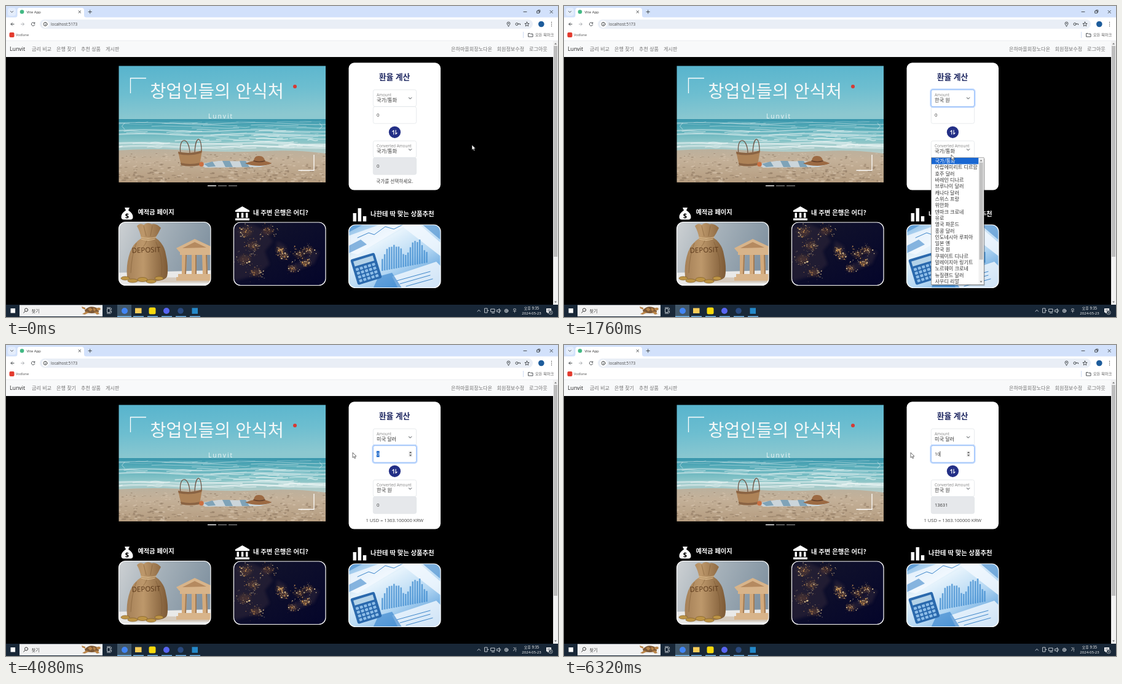
Animation of 898 by 506 pixels, one loop 6.4 s. Source, as an HTML page:

```html
<!DOCTYPE html>
<html lang="ko">
<head>
<meta charset="utf-8">
<title>Vite App</title>
<style>
html, body { margin: 0; width: 100%; height: 100%; overflow: hidden; background: #000; }
svg { display: block; width: 100vw; height: 100vh; }
text { font-family: "Open Sans", "Noto Sans CJK KR", "Noto Sans CJK", sans-serif; white-space: pre; }
.ko { font-family: "Noto Sans CJK KR", "Noto Sans CJK", sans-serif; }
.line { fill: none; stroke-linecap: round; stroke-linejoin: round; }
</style>
</head>
<body>
<svg id="stage" viewBox="0 0 898 506" preserveAspectRatio="none">
<defs>
  <linearGradient id="sky" x2=".15" y2="1"><stop stop-color="#56b3cd"/><stop offset=".55" stop-color="#6dbed0"/><stop offset="1" stop-color="#8cc8d0"/></linearGradient>
  <linearGradient id="sea" x2="0" y2="1"><stop stop-color="#3795ab"/><stop offset=".25" stop-color="#55abb8"/><stop offset=".6" stop-color="#84c3c7"/><stop offset="1" stop-color="#b9cdc8"/></linearGradient>
  <linearGradient id="sand" x2="0" y2="1"><stop stop-color="#bbb09d"/><stop offset=".3" stop-color="#c4b199"/><stop offset="1" stop-color="#b39a7d"/></linearGradient>
  <linearGradient id="wall" x2="1" y2=".3"><stop stop-color="#d0d3d5"/><stop offset=".5" stop-color="#a3afb8"/><stop offset="1" stop-color="#8293a1"/></linearGradient>
  <linearGradient id="bag" x2="1"><stop stop-color="#a58057"/><stop offset=".4" stop-color="#bd986b"/><stop offset="1" stop-color="#7d5a36"/></linearGradient>
  <linearGradient id="paper" x2=".8" y2="1"><stop stop-color="#7db5e4"/><stop offset=".35" stop-color="#e6f3fc"/><stop offset=".65" stop-color="#b4d7f3"/><stop offset="1" stop-color="#4a94d6"/></linearGradient>
  <linearGradient id="night" x2="1" y2="1"><stop stop-color="#14152c"/><stop offset="1" stop-color="#04052a"/></linearGradient>
  <filter id="soft" x="-20%" y="-20%" width="140%" height="140%"><feGaussianBlur stdDeviation="2"/></filter>
  <filter id="blur"><feGaussianBlur stdDeviation=".55"/></filter>
  <clipPath id="c0"><rect x="183.5" y="97.5" width="336.5" height="189.5"/></clipPath>
  <clipPath id="c1"><rect x="183.5" y="351.5" width="149.5" height="103" rx="11"/></clipPath>
  <clipPath id="c2"><rect x="370.5" y="352" width="149.5" height="102.5" rx="11"/></clipPath>
  <clipPath id="c3"><rect x="557.5" y="356" width="149.5" height="102.5" rx="11"/></clipPath>
</defs>
<rect width="898" height="506"/>

<!-- browser frame -->
<path fill="#d2e1fb" d="M0 0H898V22H0z"/>
<path fill="#fff" d="M0 18.500H15Q18.500 18.500 18.500 15V7Q18.500 3 22.500 3H123Q127 3 127 7V15Q127 18.500 130.500 18.500H898V57H0z"/>
<rect x="3" y="3" width="13" height="13" rx="4" fill="#e4edfc"/>
<circle cx="26" cy="9.500" r="3.300" fill="#41b883"/>
<rect x="55" y="22" width="802" height="15" rx="7.500" fill="#e9eef6"/>
<circle cx="64" cy="29.500" r="5.500" fill="#fff"/>
<g class="line" stroke="#3c4043" stroke-width=".9">
  <path d="M7.500 8.500l2 2 2-2M118 7.700l3.600 3.600m0-3.600l-3.600 3.600M134 9.500h5.400m-2.700-2.700v5.400M842 9.500h5M864 8h3.500v3.500H864zM865.500 8V6.700h3.300v3.300h-1.300M885 7.300l4.400 4.400m0-4.400l-4.400 4.400"/>
  <path d="M13 29.500H8m2.400-2.400L8 29.500l2.400 2.400M46.500 28a2.800 2.800 0 1 0 .3 2.400m0-3.600v1.500h-1.600M64 29.300v2M64 27.500v.1"/>
  <path d="M24.500 29.500h5m-2.400-2.400l2.400 2.400-2.400 2.400" stroke="#a9acb0"/>
  <circle cx="64" cy="29.500" r="3"/>
  <path d="M817.500 33q-2.500-3-2.500-4.500a2.500 2.500 0 0 1 5 0q0 1.500-2.500 4.500zM833 29h3.500v1.500M847.500 26l1 2.400 2.600.2-2 1.700.6 2.500-2.200-1.400-2.200 1.400.6-2.500-2-1.700 2.600-.2z"/>
  <circle cx="831" cy="29.500" r="2"/>
  <path d="M850 44.500h2.500l1 1h3.500v4.500h-7z"/>
</g>
<circle cx="817.500" cy="28.500" r=".9" fill="#3c4043"/>
<circle cx="870.800" cy="29.500" r="4.800" fill="#1d5c9b"/>
<path d="M887.500 26.500v.1m0 2.900v.1m0 2.900v.1" class="line" stroke="#333" stroke-width="1.300"/>
<rect x="5.500" y="43" width="8" height="8" rx="2" fill="#e33b2e"/>
<path d="M841.500 42v10" stroke="#cfdcf3"/>
<path d="M0 56.500h898" stroke="#eceef1"/>

<!-- page -->
<path fill="#f8f9fa" d="M0 57H890V83H0z"/>
<path fill="#f1f1f1" d="M890 57h8v429h-8z"/>
<path fill="#bdbdbd" d="M891 65h6v343h-6z"/>
<path fill="#777" d="M892 62.500l2-2.500 2 2.500zM892 480.500l2 2.500 2-2.500z"/>

<g clip-path="url(#c0)">
  <g filter="url(#blur)">
    <path fill="url(#sky)" d="M180 94H524V185H180z"/>
    <path fill="url(#sea)" d="M180 184H524V240H180z"/>
    <g id="waves" class="line" stroke="#edf6f5"></g>
    <path fill="url(#sand)" d="M180 235Q240 231 300 235T420 236 524 241V291H180z"/>
    <g id="grit"></g>
    <path fill="#cbd5da" d="M314 257l32-5 58 1 30 3-20 6-90 1z"/>
    <path fill="#7fa3b8" d="M322 257l14-4 5 8-12 1zM352 252h12l5 10h-12zM380 252h10l6 10h-12z"/>
    <path d="M284 240C280 212 298 212 299 239M307 240C308 210 318 210 318 236" class="line" stroke="#70584a" stroke-width="1.300"/>
    <path fill="#ad8257" d="M280 237q19 5 39-2l-4 24q-16 3-30 0z"/>
    <path fill="#8a6343" d="M280 237q19 5 39-2l-1 4q-18 6-37 2zM284 255q15 4 32 0l-1 4q-16 3-30 0z"/>
    <circle cx="318" cy="257.500" r="3.800" fill="#cb6f41"/>
    <path fill="#9c6a43" d="M389 256q7-3 14-4 1-9 9-8 8 0 9 8 7 2 12 4-10 4-21 4-14 0-23-4z"/>
    <path d="M403 252q9 3 18 0" class="line" stroke="#65412a" stroke-width="1.600"/>
  </g>
  <path fill="none" stroke="#fff" stroke-width="1.300" d="M202.500 142V117.500H228M475.500 267.500H501V242"/>
  <circle cx="470" cy="131" r="3" fill="#d63a35"/>
  <path d="M193 190.500l-4.500 5 4.500 5M510 190.500l4.500 5-4.500 5" class="line" stroke="#fff" stroke-opacity=".5"/>
</g>
<path fill="#fff" d="M328 291.800h14v1.400h-14z"/>
<path fill="#777" d="M345 291.800h14v1.400h-14zM362 291.800h14v1.400h-14z"/>

<!-- heading icons -->
<path fill="#fff" d="M193 328h8l-2 4.500q8 5 7.500 11.500-.5 3.500-4 3.500h-11q-3.500 0-4-3.500-.5-6.500 7.500-11.500z"/>
<path fill="#fff" d="M373 335v-2.500l11.500-6.500 11.500 6.500v2.500zM375.500 336.500h3.500v8h-3.500zM382.800 336.500h3.500v8h-3.500zM390 336.500h3.500v8h-3.500zM373 345.500h23v3.200h-23z"/>
<path fill="#fff" d="M564.500 337h5.500v13.500h-5.500zM572.500 329h5.500v21.500h-5.500zM580.700 342h5.500v8.500h-5.500z"/>

<g clip-path="url(#c1)"><g filter="url(#blur)">
  <path fill="url(#wall)" d="M180 348h156v110H180z"/>
  <path fill="#e9e9e8" d="M180 434l156-4v28H180z"/>
  <path fill="#a7805a" opacity=".3" d="M200 445q55-7 135 0v5H210z"/>
  <path fill="url(#bag)" d="M213 358Q218 352 224 356Q230 351 237 355Q244 353 252 361Q248 370 243 377Q257 386 260 404Q265 426 262 440Q258 449 228 448Q201 449 197 440Q195 420 202 400Q207 386 220 378Q218 367 213 358z"/>
  <path d="M219 376q12 4 25 0M220 379q11 4 22 0" class="line" stroke="#dcbd90" stroke-width="1.300"/>
  <path d="M212 386q-8 20-9 48M244 384q12 24 9 54M229 382q-2 6-6 10M224 358l4 16M238 358l-3 16" class="line" stroke="#76542f" opacity=".5"/>
  <g fill="#bd9445" stroke="#785620" stroke-width=".6">
    <ellipse cx="194" cy="443" rx="7" ry="3"/><ellipse cx="206" cy="447" rx="8" ry="3"/><ellipse cx="222" cy="445" rx="8" ry="3.500"/><ellipse cx="236" cy="448" rx="8" ry="3"/><ellipse cx="249" cy="443" rx="7" ry="3"/>
  </g>
  <path fill="#d8b48a" d="M277 394l30-15 28 13v8h-53zM283 400h50v5h-50zM280 436h54v5h-54zM277 441h57v6h-57z"/>
  <path fill="#b58a60" d="M287 394l20-10 19 9z"/>
  <path fill="#d3aa7c" d="M286 405h8l-1 31h-7zM302 405h8v31h-8zM319 405h8l1 31h-8z"/>
  <path fill="#a17a54" d="M292 405h2l-1 31h-2zM308 405h2v31h-2zM325 405h2l1 31h-2z"/>
</g></g>
<g clip-path="url(#c2)">
  <path fill="url(#night)" d="M370 352h150v103H370z"/>
  <path fill="#35293a" opacity=".5" filter="url(#soft)" d="M370 360l30-5 24 12 10 16-13 16 8 21-20 18-40 10zM441 382l14 8 5 19-13 5-8-18zM460 424l22-10 16-18 12 4-9 20-38 14z"/>
  <g id="glows" fill="#a8672c" filter="url(#soft)"></g>
  <g id="lights"></g>
</g>
<g clip-path="url(#c3)"><g filter="url(#blur)">
  <path fill="url(#paper)" d="M554 352h157v110H554z"/>
  <path fill="#f5fbff" opacity=".8" d="M557 374l50-18h45l-80 48-15-3zM640 355h32l35 30v22zM628 440l72-24 8 8v36h-70z"/>
  <path fill="#4189cb" opacity=".6" d="M554 352h34l-34 18zM673 352h38v32zM554 392l23-12 10 8-33 16z"/>
  <path fill="#2f7fcb" opacity=".6" d="M606 440l22-6 18 28h-50z"/>
  <g id="bars" fill="#3d8bd0" opacity=".75"></g>
  <path class="line" stroke="#3c85ca" d="M572 377l18-8 9 3 18-13 14 4 22-11M636 447l54-15M641 452l49-14M651 456l43-12"/>
  <g transform="translate(560 413) rotate(-17)">
    <rect width="41" height="43" rx="3" fill="#2a69ad"/>
    <rect x="4" y="4" width="33" height="8.500" fill="#b3d2e8"/>
    <g id="keys" fill="#8dbde8"></g>
  </g>
</g></g>
<g fill="none" stroke="#fff" stroke-width="1.200">
  <rect x="183.500" y="351.500" width="149.500" height="103" rx="11"/>
  <rect x="370.500" y="352" width="149.500" height="102.500" rx="11"/>
  <rect x="557.500" y="356" width="149.500" height="102.500" rx="11"/>
</g>

<!-- exchange card -->
<rect x="557.500" y="92.300" width="149.500" height="207.300" rx="9" fill="#fff"/>
<g fill="#fff" stroke="#dee2e6" stroke-width=".7">
  <rect x="597.300" y="136.300" width="70.200" height="27.200" rx="2.800"/>
  <rect x="597.300" y="163.700" width="70.200" height="27.500" rx="2.800"/>
  <rect x="597.300" y="219.500" width="70.200" height="27.200" rx="2.800"/>
  <rect x="597.300" y="246.800" width="70.200" height="27.500" rx="2.800" fill="#e6e8eb"/>
</g>
<rect id="glow" x="596.200" width="72.400" height="29.600" rx="3.800" fill="none" stroke="#0d6efd" stroke-opacity=".25" stroke-width="1.900"/>
<rect id="ring" x="597.300" width="70.200" height="27.400" rx="2.800" fill="none" stroke="#86b7fe" stroke-width=".8"/>
<path d="M655.300 149l2.200 2.200 2.200-2.200M655.300 232.700l2.200 2.200 2.200-2.200" class="line" stroke="#343a40"/>
<circle cx="632.400" cy="205.300" r="9.600" fill="#232f86"/>
<path d="M630.700 208.800v-6.500l-2 2M634 202v6.500l2-2" class="line" stroke="#fff" stroke-width="1.100"/>
<g id="spin"><rect x="655" y="172.500" width="6" height="9.500" fill="#ececec"/><path fill="#555" d="M656 176l2-2.500 2 2.500zM656 178.500l2 2.500 2-2.500z"/></g>
<rect id="pick" x="602.800" y="172.500" width="4.700" height="9.800" fill="#1a66c9"/>
<path id="caret" d="M611.800 172.800v9" stroke="#111" stroke-width=".7"/>

<!-- taskbar -->
<path fill="#182737" d="M0 486h898v20H0z"/>
<path fill="#f1f1f1" d="M22 486.500h135V505H22z"/>
<path fill="#41576a" d="M181 486h23v20h-23z"/>
<path fill="#76b9ed" d="M181 504.600h23v1.400h-23zM207 504.600h17v1.400h-17zM230 504.600h17v1.400h-17zM253 504.600h17v1.400h-17zM276 504.600h17v1.400h-17zM299 504.600h17v1.400h-17z"/>
<rect x="7.500" y="492" width="7.500" height="7.500" fill="#fff"/>
<circle cx="33" cy="494.500" r="2.600" class="line" stroke="#333"/>
<path d="M31 496.500l-2.500 3" stroke="#333"/>
<g fill="#b98448"><path d="M128 495q8-9 19-4 4 3 4 7-12 4-22 0z" fill="#7d5835"/><path d="M147 492q6-3 7 1-1 3-6 2zM131 497l-7 4 4 1 7-3zM143 498l5 4 4-1-3-4zM129 491l-6-2 1 3 5 2z"/><path d="M133 493l4-2 4 3-4 3zM142 491l4 2-1 4-3-2z"/></g>
<g class="line" stroke="#e8edf1" stroke-width=".8">
  <path d="M165 492.500h4.500v6H165zM171.500 492v2m0 2v3M164.500 490.800h5.500M164.500 500.200h5.500"/>
  <path d="M767 497l2.300-2.500 2.300 2.500M779 492h4v7h-4zM783.500 495.500h1.500M789 493h6v4.500h-6zM790.500 499.500h4M799 494.500h1.500l2-2v7l-2-2H799zM804 494q1.500 1.700 0 3.500"/>
  <circle cx="814" cy="496" r="2.800"/><path d="M812.500 496h3M814 494.500v3"/>
</g>
<path fill="#fff" d="M879 492h8v6.500h-4l-2 2v-2h-2z"/>
<path d="M880.500 494h5m-5 2h5" stroke="#182737" stroke-width=".7"/>
<circle cx="886" cy="498.800" r="3.200" fill="#2c3a48" stroke="#fff" stroke-width=".5"/>
<circle cx="193" cy="496" r="5" fill="#4285f4"/>
<rect x="210" y="491.500" width="10.500" height="8.500" fill="#f7cc58"/>
<rect x="232.500" y="490.500" width="11" height="11" rx="2.500" fill="#f7d90c"/>
<circle cx="261" cy="496" r="5" fill="#5865f2"/>
<circle cx="284" cy="496" r="4.800" fill="#2a4a80"/>
<rect x="302.500" y="491.300" width="9.500" height="9.500" fill="#2489ca"/>

<g id="labels"></g>
<g id="menu">
  <rect x="598.500" y="1.500" width="86" height="207" fill="#000" opacity=".25"/>
  <rect x="597.500" y=".2" width="85.500" height="206.600" fill="#fff" stroke="#777" stroke-width=".7"/>
  <rect id="mark" x="598" width="76.500" height="10.310" fill="#1967d2"/>
  <g id="rows"></g>
  <path fill="#f1f1f1" d="M674.500.6h8.200v205.800h-8.200z"/>
  <path fill="#777" d="M676.500 6l2-2.500 2 2.500zM676.500 201l2 2.500 2-2.500z"/>
  <rect id="thumb" x="675.500" width="6.200" height="158" fill="#c1c1c1"/>
</g>
<path id="arrow" fill="#fff" stroke="#111" stroke-width=".6" d="M0 0v8.300l1.900-1.700 1.300 3 1.400-.6-1.300-2.900h2.600z"/>
<path id="hand" fill="#fff" stroke="#111" stroke-width=".6" d="M-1 -2.500q1-1 1.700 0v3.300l4 1q1 .4.900 1.700l-.8 4.800H.2L-3 4.200q.3-1.300 2 0z"/>
</svg>
<script>
const $ = id => document.getElementById(id);
const NS = "http://www.w3.org/2000/svg";
const add = (parent, tag, attrs) => {
  const el = document.createElementNS(NS, tag);
  for (const k in attrs) el.setAttribute(k, attrs[k]);
  return parent.appendChild(el);
};
const set = (id, attrs) => { for (const k in attrs) $(id).setAttribute(k, attrs[k]); };
const show = (id, on) => set(id, { visibility: on ? "visible" : "hidden" });

function label(x, y, size, str, fill = "#333", more = {}, parent = $("labels")) {
  const el = add(parent, "text", { x, y, "font-size": size, fill, ...more });
  if (/[가-힣]/.test(str)) el.setAttribute("class", "ko");
  el.textContent = str;
  return el;
}
function write(el, str) {
  if (el.textContent === str) return;
  el.textContent = str;
  el.setAttribute("class", /[가-힣]/.test(str) ? "ko" : "");
}

let seed = 7;
const rnd = () => (seed = seed * 16807 % 2147483647) / 2147483647;
const bell = () => rnd() + rnd() + rnd() - 1.5;

// photo textures
for (let i = 0; i < 70; i++) {
  const near = rnd(), x = 165 + rnd() * 340, y = 188 + near * 44, w = 14 + rnd() * 70;
  add($("waves"), "path", { d: `M${x} ${y}q${w / 4} ${-1 - near} ${w / 2} 0t${w / 2} ${bell()}`,
    "stroke-width": .5 + near * 1.6, opacity: .25 + rnd() * .45 });
}
for (const y of [191, 203, 209, 224, 229])
  add($("waves"), "path", { d: `M180 ${y}q45-3 90 0t90 0 90 0 90 1`, "stroke-width": 1 + (y - 188) / 16, opacity: .5 });
for (let i = 0; i < 420; i++) {
  const far = rnd();
  add($("grit"), "ellipse", { cx: 183 + rnd() * 337, cy: 240 + far * 47, rx: 1 + rnd() * (1.5 + far * 2.5), ry: .4 + rnd() * (.5 + far),
    fill: rnd() < .5 ? "#86705a" : "#dccab3", opacity: .5 });
}
const towns = [[390, 368, 16], [402, 390, 14], [388, 412, 16], [407, 434, 14], [426, 366, 15],
  [446, 397, 9], [453, 406, 9], [478, 404, 13], [492, 397, 12], [466, 427, 10], [488, 418, 9]];
for (const [x, y, r] of towns) {
  add($("glows"), "ellipse", { cx: x, cy: y, rx: r * .6, ry: r * .4, opacity: 4 / r });
  for (let i = 0; i < 48; i++)
    add($("lights"), "circle", { cx: x + bell() * r, cy: y + bell() * r * .8, r: .3 + rnd() * rnd() * 1.2,
      fill: rnd() < .35 ? "#ffe3a6" : "#c8914f", opacity: .35 + rnd() * .6 });
}
for (let i = 0; i < 20; i++) {
  const h = 10 + 26 * Math.abs(Math.sin(i * .33)) + rnd() * 10;
  add($("bars"), "rect", { x: 611 + i * 3.8, y: 431 - i * .7 - h, width: 2.5, height: h });
}
for (let i = 0; i < 20; i++)
  add($("keys"), "rect", { x: 4 + i % 5 * 6.9, y: 16 + (i / 5 | 0) * 6.4, width: 5, height: 4.4, rx: 1 });

// fixed text
const mid = { "text-anchor": "middle" }, bold = { "font-weight": 700 };
label(33.5, 12, 6, "Vite App");
label(73, 31.8, 6.4, "localhost:5173", "#444");
label(16, 48.8, 5.6, "Vodlane", "#555");
label(861, 49, 6.2, "모든 북마크", "#555");
label(6, 73, 8.8, "Lunvit", "#222", { "font-weight": 500 });
[[42, "금리 비교"], [82, "은행 찾기"], [122, "추천 상품"], [162, "게시판"],
 [724, "은하마을회장노다온"], [798.5, "회원정보수정"], [851, "로그아웃"]].forEach(([x, s]) => label(x, 72.8, 8.1, s, "#757575"));
label(343, 148.7, 28.5, "창업인들의 안식처", "#f4f8f8", { ...mid, "font-weight": 300 });
label(329, 183, 10.2, "Lunvit", "#eef6f7", { "letter-spacing": 2 });
label(632, 119.7, 12.8, "환율 계산", "#1e2761", { ...mid, ...bold });
label(214.5, 339.3, 10.2, "예적금 페이지", "#fff", bold);
label(402, 340, 10.3, "내 주변 은행은 어디?", "#fff", bold);
label(593, 341.7, 10.3, "나한테 딱 맞는 상품추천", "#fff", bold);
label(197, 344.5, 11, "$", "#000", { ...mid, ...bold });
label(228, 401, 11.5, "DEPOSIT", "#593719", { ...mid, transform: "rotate(-2 228 401)" });
label(603, 146.8, 6.4, "Amount", "#858585");
label(603, 230, 6.4, "Converted Amount", "#858585");
label(41.5, 498.6, 7.2, "찾기", "#444");
label(855, 493.6, 6, "오후 9:35", "#fff", mid);
label(855, 501.8, 6, "2024-05-23", "#fff", mid);
label(886, 500.4, 4.2, "3", "#fff", mid);

const from = label(603, 156, 8.1, ""), to = label(603, 239.3, 8.1, "");
const amount = label(603, 180, 7.5, ""), result = label(603, 263.2, 7.5, "");
const rate = label(632.3, 287.7, 7.6, "", "#444", mid);
const ime = label(827.5, 498.4, 6.6, "", "#fff", mid);

const coins = ("국가/통화,아랍에미리트 디르함,호주 달러,바레인 디나르,브루나이 달러,캐나다 달러,스위스 프랑," +
  "위안화,덴마크 크로네,유로,영국 파운드,홍콩 달러,인도네시아 루피아,일본 옌,한국 원,쿠웨이트 디나르," +
  "말레이지아 링기트,노르웨이 크로네,뉴질랜드 달러,사우디 리알,스웨덴 크로나,싱가포르 달러,태국 바트,미국 달러").split(",");
const NONE = coins[0], KRW = coins[14], USD = coins[23];
const ROW = 10.31, SEEN = 20;
const rows = Array.from({ length: SEEN }, (_, i) => label(603.5, 8.5 + i * ROW, 8.1, "", "#333", {}, $("rows")));

const path = [[0, 758, 226], [80, 758, 226], [480, 662, 152], [640, 652, 152], [960, 622, 295], [1120, 620, 313],
  [1200, 620, 313], [1520, 630, 242], [1840, 630, 242], [2240, 618, 440], [2640, 616, 453], [3040, 616, 453],
  [3360, 632, 206], [3520, 632, 206], [3760, 612, 176], [3840, 612, 176], [4000, 564, 175], [6400, 564, 175]];
function pointer(t) {
  const i = path.findIndex(p => p[0] > t), [t0, x0, y0] = path[i - 1], [t1, x1, y1] = path[i];
  const u = (t - t0) / (t1 - t0), e = u * u * (3 - 2 * u);
  return [x0 + (x1 - x0) * e, y0 + (y1 - y0) * e];
}

function drawMenu(top, scroll, my) {
  const hot = Math.max(0, Math.min(SEEN - 1, Math.floor((my - top - .3) / ROW)));
  set("menu", { transform: `translate(0 ${top})` });
  set("mark", { y: .4 + hot * ROW });
  set("thumb", { y: 8 + scroll * 8 });
  rows.forEach((el, i) => {
    write(el, coins[i + scroll]);
    el.setAttribute("fill", i === hot ? "#fff" : "#333");
  });
}

function draw(t) {
  const [x, y] = pointer(t);
  const first = t >= 640 && t < 1200, second = t >= 1680 && t < 2800;
  const swapped = t >= 3520, typing = t >= 3840;
  const entry = t >= 4880 ? "10" : t >= 4640 ? "1" : "0";

  write(from, t < 1200 ? NONE : swapped ? USD : KRW);
  write(to, t < 2800 ? NONE : swapped ? KRW : USD);
  write(amount, entry);
  write(result, String(+(entry * 1363.1).toFixed(1)));
  write(rate, t < 2800 ? "국가를 선택하세요." : swapped ? "1 USD = 1363.100000 KRW" : "1 KRW = 0.000734 USD");
  write(ime, typing ? "가" : "우");

  const selected = t >= 3920 && t < 4640;
  amount.setAttribute("fill", selected ? "#fff" : "#333");
  show("pick", selected);
  show("caret", t >= 4880);
  show("spin", typing);

  const focus = typing ? 163.7 : t >= 2800 && !swapped ? 219.5 : t >= 640 && t < 2800 ? 136.3 : 0;
  set("ring", { y: focus });
  set("glow", { y: focus - 1.1 });
  show("ring", focus);
  show("glow", focus);

  show("menu", first || second);
  if (first) drawMenu(163.2, 0, y);
  if (second) drawMenu(246.6, Math.max(0, Math.min(4, Math.floor((t - 2240) / 80))), y);

  const link = !first && !second && (y > 352 && y < 459 || Math.hypot(x - 632.4, y - 205.3) < 9.6);
  for (const id of ["arrow", "hand"]) set(id, { transform: `translate(${x} ${y})` });
  show("arrow", !link);
  show("hand", link);
}

const start = performance.now();
function tick() {
  const t = (performance.now() - start) % 6400;
  draw(Math.floor(t / 80) * 80);
  requestAnimationFrame(tick);
}
tick();
</script>
</body>
</html>
```
